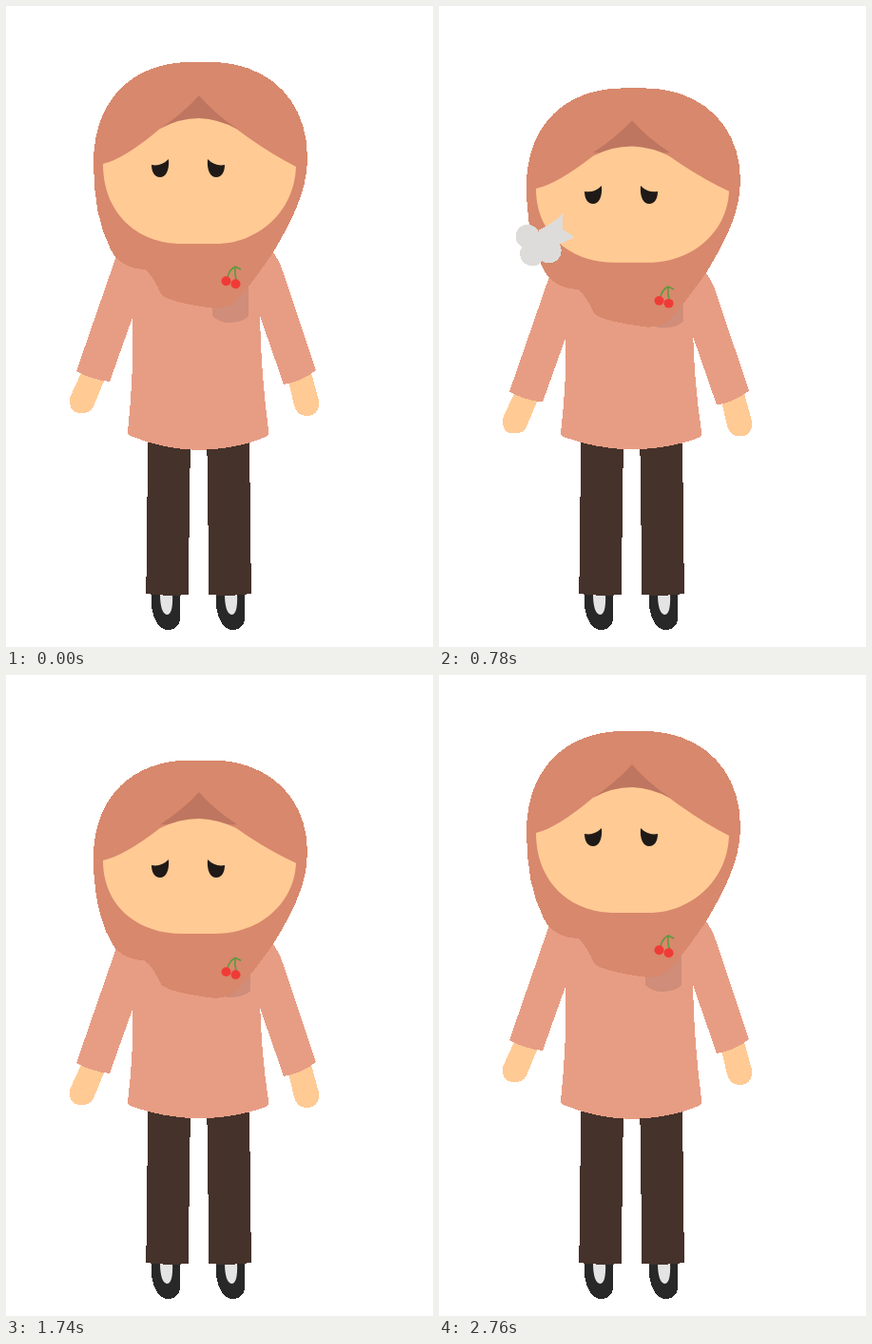
These frames come from a looping animation (449x674 px, 3000 ms). An HTML page:

```html
<!DOCTYPE html>
<html lang="en">
<head>
<meta charset="utf-8">
<title>Sigh</title>
<style>
  html, body { margin: 0; width: 100%; height: 100%; overflow: hidden; background: #fff; }
  svg { display: block; width: 100%; height: 100%; }
  .crisp { shape-rendering: crispEdges; }
</style>
</head>
<body>
<svg viewBox="0 0 449 674">
  <defs>
    <g id="shoe">
      <path class="crisp" fill="#282829" d="M153 617V631Q157 656 171 656Q183 655 183 642V617Z"/>
      <path fill="#e4e4e4" d="M162 618H175Q176 640 169 640Q162 638 162 618Z"/>
    </g>
    <path id="leg" class="crisp" fill="#45322a" d="M149.300 450L147.300 618Q169 621 191.700 619L194 450Z"/>
    <path id="eye" fill="#1f1a17" d="M153 167Q163 169 171 161C172 173 168 180 162 180C156 180 153 174 153 167Z"/>
  </defs>

  <use href="#shoe"/>
  <use href="#shoe" x="68"/>
  <use href="#leg"/>
  <use href="#leg" transform="translate(405.200) scale(-1 1)"/>

  <g id="arms" class="crisp">
    <g fill="#ffca94">
      <path d="M79 386L67.500 411Q65 428 79 428Q89 428 92 421L104 392Z"/>
      <path d="M297 394L303 420Q306 431 317 431Q330 430 329 415L321 386Z"/>
    </g>
    <g fill="#e79d84">
      <path d="M117 260L74 384Q90 393 109 395L135 322L155 270Z"/>
      <path d="M279 257Q286 265 290 276L326 383Q311 395 292 398L266 323L245 280Z"/>
    </g>
  </g>
  <path id="torso" class="crisp" fill="#e79d84" d="M133 268V326Q135 380 128 447Q128 451 131 452Q165 466 202 467Q243 466 273 453Q277 451 276 446Q268 385 267 325V268Z"/>
  <path id="fold" fill="#d08d79" d="M217 312V326Q226 334 236 333Q250 332 255 326V290Z"/>

  <g id="scarf">
    <path class="crisp" fill="#d8886c" d="M194 59C134 59 92 98 92 165C92 205 99 238 113 261Q124 276 146 277Q155 284 163 303Q172 312 220 318Q234 317 241 311Q255 297 281 259C296 233 317 198 317 160C317 98 275 59 215 59Z"/>
    <path fill="#bf7660" d="M203 94Q186 113 162 129H243Q219 113 203 94Z"/>
    <path fill="none" stroke="#5b9b3f" stroke-width="1.600" d="M233 285Q235 277 241 274L247 277M241 274Q240 281 242 288"/>
    <g fill="#ef3b36">
      <circle cx="231.500" cy="289.300" r="5"/>
      <circle cx="241.500" cy="292.300" r="5"/>
    </g>
  </g>
  <path id="face" fill="#ffca94" d="M102 166Q124 161 162 129Q182 118 203 118Q224 119 242 129Q275 154 305 169C303 217 265 250 220 250H185C137 250 102 217 102 166Z"/>
  <g id="eyes">
    <use href="#eye"/>
    <use href="#eye" transform="translate(383) scale(-1 1)"/>
  </g>

  <g id="puff" class="crisp" fill="#dddcda">
    <circle cx="104.500" cy="233" r="12.500"/>
    <circle cx="109.500" cy="251" r="13"/>
    <circle cx="127" cy="248" r="13"/>
    <path d="M108 236L117 226Q130 220 142 209L141 225L154 234L138 241L124 252Z"/>
  </g>
</svg>
<script>
const LOOP = 3000, EYE_LAG = 30;
const part = id => document.getElementById(id);
const [arms, torso, fold, scarf, face, eyes, puff] =
  ['arms', 'torso', 'fold', 'scarf', 'face', 'eyes', 'puff'].map(part);

const ease = (t, from, to) => {
  const u = Math.min(1, Math.max(0, (t - from) / (to - from)));
  return u * u * (3 - 2 * u);
};

// 0 is upright, 1 is fully slumped.
const slump = t => ease(t, 300, 900) - ease(t, 2100, 2700);

const move = (el, x, y) => el.setAttribute('transform', `translate(${x} ${y})`);

// Lower the line y0 by drop while scaling vertically around it.
const squash = (el, y0, drop, scale) =>
  el.setAttribute('transform', `translate(0 ${y0 + drop - y0 * scale}) scale(1 ${scale})`);

function draw(t) {
  const sag = slump(t);
  move(arms, 0, 24 * sag);
  squash(torso, 462, 0, 1 - 0.12 * sag);
  move(fold, 2 * sag, 6 * sag);
  squash(scarf, 59, 30.5 * sag, 1 - 0.033 * sag);
  squash(face, 118, 33 * sag, 1 - 0.083 * sag);
  move(eyes, 0, 33 * slump(t - EYE_LAG));

  const age = t - 510;
  move(puff, -0.042 * age, 0.0343 * age);
  puff.style.display = t >= 330 && t < 1740 ? '' : 'none';
}

const start = performance.now();
function tick() {
  draw((performance.now() - start) % LOOP);
  requestAnimationFrame(tick);
}
tick();
</script>
</body>
</html>
```
